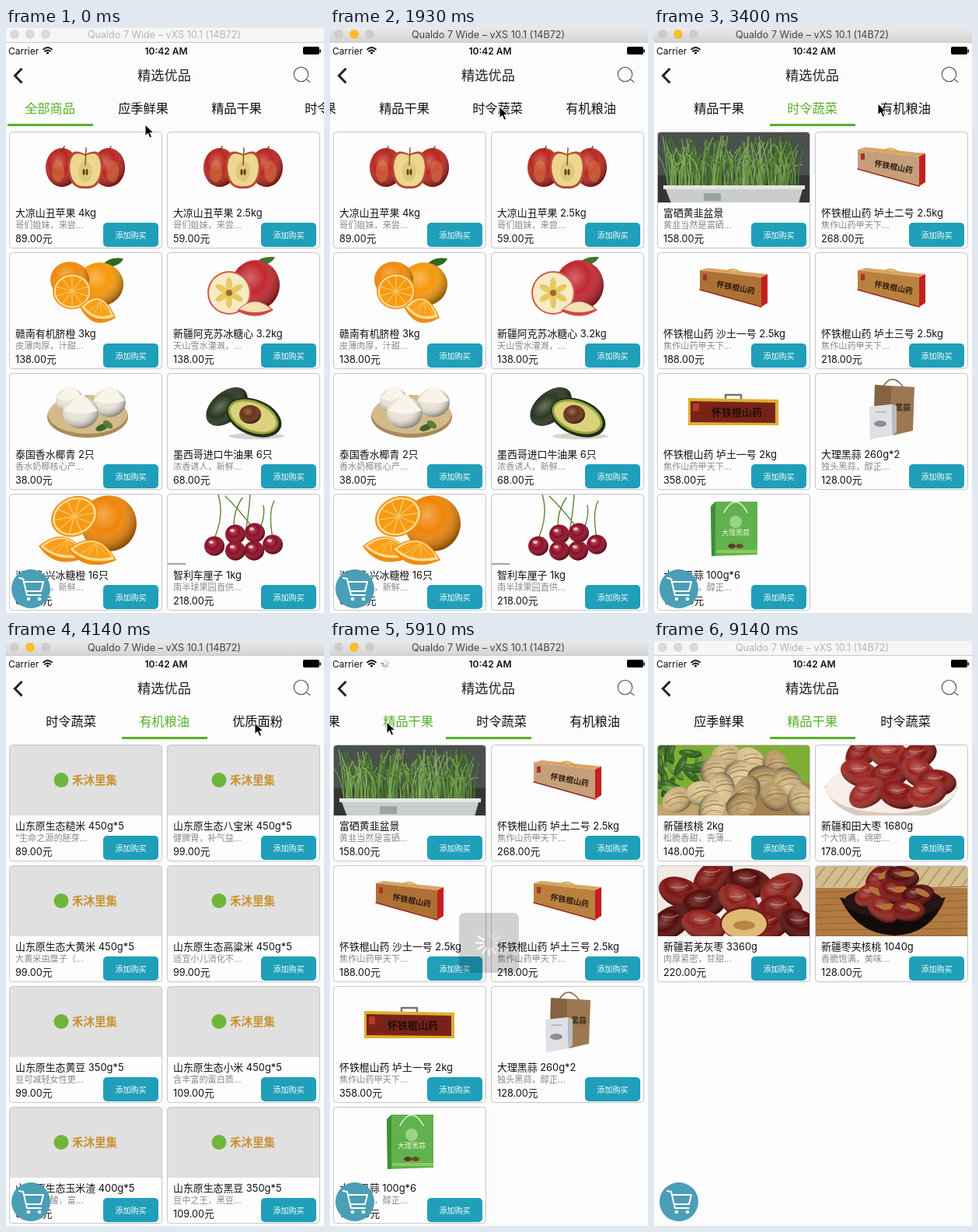
An HTML page that plays this animation: 409 by 751 pixels, repeating every 9200 ms.

```html
<!DOCTYPE html>
<html lang="zh-CN">
<head>
<meta charset="utf-8">
<style>
  html, body { margin: 0; width: 100%; height: 100%; overflow: hidden; background: #fcfcfc; }
  svg { display: block; font-family: Inter, "Noto Sans CJK SC", "Noto Sans CJK", sans-serif; }
</style>
</head>
<body>
<svg id="stage" width="409" height="751" viewBox="0 0 409 751"></svg>
<script>
const LOOP = 9200;
const stage = document.getElementById('stage');
let seed = 11;
const rand = () => (seed = seed * 16807 % 2147483647) / 2147483647;
const pick = list => list[Math.floor(rand() * list.length)];
const repeat = (n, make) => Array.from({ length: n }, (_, i) => make(i)).join('');

// Shape helpers
const rect = (x, y, w, h, fill, extra = '') =>
  `<rect x="${x}" y="${y}" width="${w}" height="${h}" fill="${fill}" ${extra}/>`;
const ell = (x, y, rx, ry, fill, turn = 0) =>
  `<ellipse cx="${x}" cy="${y}" rx="${rx}" ry="${ry}" fill="${fill}" transform="rotate(${turn} ${x} ${y})"/>`;
const ball = (x, y, rx, ry, fill, turn = 0) =>
  ell(x, y, rx, ry, fill, turn) + ell(x, y, rx, ry, 'url(#shade)', turn);
const path = (d, fill) => `<path d="${d}" fill="${fill}"/>`;
const line = (d, color, width = 1) =>
  `<path d="${d}" fill="none" stroke="${color}" stroke-width="${width}" stroke-linecap="round" stroke-linejoin="round"/>`;
const text = (x, y, size, fill, str, extra = '') =>
  `<text x="${x}" y="${y}" font-size="${size}" fill="${fill}" ${extra}>${str}</text>`;
const MID = 'text-anchor="middle"';
const heap = (n, x, y, w, h, rx, ry, colors) => repeat(n, () => {
  const a = rand() * 2 * Math.PI, r = Math.sqrt(rand());
  return ball(x + w * r * Math.cos(a), y + h * r * Math.sin(a), rx, ry, pick(colors), rand() * 180);
});
const spokes = (n, inner, outer, color, width) => repeat(n, i =>
  `<path d="M0 ${-inner}V${-outer}" stroke="${color}" stroke-width="${width}" stroke-linecap="round"
    opacity="${(i + 1) / n}" transform="rotate(${i * 360 / n})"/>`);

// Product pictures, 196 by 90
const citrus = (x, y, rx, ry, turn = 0) =>
  `<g transform="translate(${x} ${y}) rotate(${turn}) scale(${rx} ${ry})">` +
  ell(0, 0, 1, 1, '#f08f0c') + ell(0, 0, .93, .93, '#fbdc9a') + ell(0, 0, .84, .84, '#f79a14') +
  repeat(10, i => `<path d="M0 0V-.84" stroke="#fcc864" stroke-width=".05" transform="rotate(${i * 36})"/>`) + '</g>';
const wedge = (x, y, w) =>
  path(`M${x} ${y}Q${x + w * .6} ${y - 30} ${x + w} ${y + 14}Q${x + w * .35} ${y + 32} ${x} ${y}Z`, '#f08a0c') +
  path(`M${x + 2} ${y}Q${x + w * .6} ${y - 27} ${x + w - 2} ${y + 13}Q${x + w * .4} ${y + 22} ${x + 2} ${y}Z`, '#fcdc98') +
  path(`M${x + 6} ${y}Q${x + w * .6} ${y - 22} ${x + w - 6} ${y + 10}Q${x + w * .42} ${y + 17} ${x + 6} ${y}Z`, '#f9a01a') +
  repeat(4, i => line(`M${x + w * .58} ${y - 7}L${x + w * (.2 + i * .2)} ${y + 8}`, '#fcc864'));
const yamBox = (front, label = '#2c1a12') =>
  path('M55 22L65 19L142 27L134 31Z', '#d9a468') + path('M55 22L134 31V69L55 47Z', front) +
  path('M134 31L142 27V64L134 69Z', '#c4201f') + line('M55 47L134 69', '#9c2a1e', 1.5) +
  line('M88 24Q98 16 110 27', '#d2a63c', 1.5) + rect(59, 27, 5, 8, '#a83325') +
  text(76, 43, 10, label, '怀铁棍山药', 'font-weight="800" transform="rotate(11 76 43)"');
const walnut = ([x, y], i) => ball(x, y, 20, 16, ['#cdb27c', '#d8c08c', '#b99a63'][i % 3], i * 37) +
  line(`M${x - 15} ${y + 4}Q${x} ${y - 9} ${x + 16} ${y - 2}`, '#866534') +
  line(`M${x - 10} ${y + 9}Q${x} ${y - 1} ${x + 12} ${y + 6}M${x - 8} ${y - 6}Q${x + 2} ${y - 11} ${x + 9} ${y - 8}`, '#a5854f');
const date = (rx, ry, colors) => ([x, y], i) =>
  ball(x, y, rx, ry, colors[i % colors.length], i * 47 % 80 - 40) +
  line(`M${x - rx * .5} ${y - ry * .2}q${rx * .4} ${ry * .5} ${rx} ${-ry * .2}`, '#3a080855', 2) +
  line(`M${x - rx * .4} ${y - ry * .4}q${rx * .4} ${ry * .2} ${rx * .7} ${-ry * .1}`, '#e09a8caa', 1.4);
const darkDates = ['#7c1512', '#550d0b', '#92241d'];
const grains = ['#d9b48a', '#bd8b5d', '#e5c8a0'];
const beans = ['#6f2f25', '#d6b58c', '#e9dac2', '#43201c', '#a3674a'];

const photos = {
  apples: () => [68, 128].map((x, i) => ball(x, 45, 21, 25, '#bb2620') +
      ell(x + 10 * i - 5, 50, 8, 14, '#d98a4470') + line(`M${x} 24L${x + 3} 18`, '#6b4423', 1.5)).join('') +
    path('M98 28Q76 16 75 44Q77 74 98 72Q119 74 121 44Q120 16 98 28Z', '#b84a30') +
    path('M98 30Q79 20 78 45Q80 71 98 69Q116 71 118 45Q117 20 98 30Z', '#ecd690') +
    ell(98, 50, 9, 13, '#dfc678') + ell(96, 51, 1.5, 4, '#6b3a1c') + ell(100, 51, 1.5, 4, '#6b3a1c') +
    line('M98 42L99 20', '#7a5a30', 1.5),
  navel: () => path('M118 18Q127 3 147 7Q142 19 118 18Z', '#2f6a22') + ball(117, 40, 30, 28, '#f5980c') +
    ball(78, 34, 25, 23, '#f18a0c') + citrus(81, 49, 25, 23) + wedge(91, 69, 46),
  sweetApple: () => path('M110 18Q118 3 139 5Q133 17 110 18Z', '#3d7628') + ball(114, 41, 31, 32, '#c2272f') +
    ell(80, 51, 28, 28, '#cf5a4a') + ell(80, 51, 26, 26, '#f6ebc4') +
    repeat(6, i => ell(80, 40, 4, 9, '#e9c860').replace('rotate(0 80 40)', `rotate(${i * 60} 80 51)`)) +
    ell(80, 51, 4, 4, '#9c6a30') +
    path('M90 74Q112 50 137 73Q114 88 90 74Z', '#cf4a41') + path('M93 72Q113 53 134 72Q114 80 93 72Z', '#f2e2b4'),
  coconut: () => ell(101, 55, 52, 27, '#a98a58') + ell(101, 52, 51, 25, '#d3ba8c') +
    [[78, 34, 18], [129, 37, 21], [92, 50, 23]].map(([x, y, r]) =>
      ball(x, y, r, r * .88, '#e9e2d5') +
      path(`M${x - r + 1} ${y - 3}L${x - 3} ${y - r}L${x + 4} ${y - r}L${x + r - 1} ${y - 3}Q${x} ${y + 5} ${x - r + 1} ${y - 3}Z`, '#f8f4ea')).join('') +
    ell(119, 69, 8, 4, '#3c6426', -20) + ell(127, 65, 7, 4, '#587f38', 35),
  avocado: () => ell(115, 80, 36, 4, '#d4d4ce') + ball(77, 42, 31, 19, '#2b3820', -40) +
    ell(112, 56, 37, 23, '#232f16', 22) + ell(111, 55, 34, 20, '#93a440', 22) +
    ell(111, 55, 31, 17, '#dcd17c', 22) + ball(107, 52, 14, 12, '#6a3216'),
  oranges: () => ball(128, 37, 36, 36, '#ef8508') + citrus(84, 28, 31, 25, -25) + wedge(38, 66, 62) + wedge(76, 70, 62),
  cherries: () => line('M61 56Q74 26 66 0M88 52Q82 26 97 4M113 46Q92 18 75 2M101 48Q106 20 107 0M136 56Q130 22 138 8M110 66Q128 32 124 14', '#5f8436', 1.4) +
    [[88, 51], [113, 49], [61, 66], [136, 64], [112, 72], [88, 72]].map(([x, y]) =>
      ball(x, y, 13, 12.5, '#8f0d26') + ell(x - 4, y - 5, 3, 2, '#f2b9c0')).join('') +
    line('M0 89H24', '#5d4638'),
  chives: () => rect(0, 0, 197, 91, '#4a504d') + rect(0, 55, 197, 36, '#343633') +
    repeat(260, () => {
      const x = 14 + rand() * 168;
      return line(`M${x} 72Q${x + rand() * 6 - 3} 40 ${x + rand() * 36 - 18} ${4 + rand() * 38}`,
        pick(['#4d7a31', '#6b9a45', '#3d6428', '#88ad60']), 1.2);
    }) + path('M10 70H188L182 91H18Z', '#c9cecd') + path('M8 68H190V73H8Z', '#e4e6e4') + rect(60, 78, 22, 10, '#98a59d'),
  yamTwo: () => yamBox('#c59f7a'),
  yamSand: () => yamBox('#ad7136'),
  yamThree: () => yamBox('#b9813d'),
  yamCase: () => line('M88 33V27H108V33', '#77736b', 2.5) + path('M40 31L156 33V66L40 66Z', '#dcb02e') +
    path('M43 35L152 37V63L43 62Z', '#7b2218') + rect(46, 38, 8, 10, '#b9382a') +
    text(70, 54, 13, '#1d100c', '怀铁棍山药', 'font-weight="800"'),
  garlicBox: () => path('M77 14L128 17L126 73L100 79L76 60Z', '#9b7851') + path('M77 14L98 17V70L76 60Z', '#836340') +
    line('M88 16Q99 -2 113 16', '#7b6044', 1.5) + text(103, 47, 10, '#3e2a1b', '黑蒜', 'font-weight="700"') +
    path('M70 42L99 39L100 79L71 84Z', '#dfe0e5') + path('M99 39L105 41V75L100 79Z', '#b9bbc2') +
    ell(84, 64, 8, 4, '#8d8d92') + line('M78 49H91', '#999'),
  garlicBag: () => path('M69 15L75 9H129V77L70 79Z', '#5fb24d') + path('M69 15L75 9V78L70 79Z', '#3f8f39') +
    line('M86 23Q101 -4 116 23', '#e8f0da', 1.5) + ell(101, 35, 8, 8, '#9bd287') +
    text(101, 52, 9, '#f3f7dc', '大理黑蒜', MID) + ell(96, 66, 5, 3, '#5b3a25') + ell(106, 66, 5, 3, '#6f4a2c') + rect(76, 71, 53, 4, '#8cc95e'),
  brownRice: () => rect(0, 0, 197, 91, '#3a2a23') + ball(27, 12, 34, 24, '#76543c') + rect(0, 62, 197, 29, '#7b706a') +
    path('M50 45H196Q188 84 124 86Q62 84 50 45Z', '#bcc6cc') + ell(123, 46, 73, 16, '#dde3e5') +
    ell(121, 34, 58, 25, '#c59a6c') + heap(170, 121, 34, 57, 24, 3.2, 1.4, grains) +
    text(18, 67, 16, '#fff', '原生态糙米', 'font-weight="600"'),
  mixedRice: () => rect(0, 0, 197, 91, '#2a1b17') + ball(24, 10, 42, 34, '#6a3c26') + heap(60, 24, 20, 34, 20, 3, 2, beans) +
    path('M72 38H182Q178 82 127 84Q78 82 72 38Z', '#7c4a2d') + ell(127, 38, 56, 25, '#a06a43') +
    ell(127, 38, 50, 21, '#8a5d49') + heap(110, 127, 38, 48, 20, 3.8, 2.6, beans) +
    text(17, 65, 16, '#fff', '原生态八宝米', 'font-weight="600"'),
  walnuts: () => rect(0, 0, 197, 91, '#7fae35') + heap(22, 24, 26, 36, 34, 15, 5, ['#2f6419', '#5f9330', '#437a22']) +
    rect(0, 76, 197, 15, '#c2a46c') + path('M120 52Q160 34 197 50V91H112Z', '#a3804c') +
    [[90, 14], [120, 20], [152, 26], [72, 32], [104, 36], [136, 42], [168, 46], [84, 54], [116, 58], [26, 70], [58, 62], [150, 66], [184, 70], [70, 80], [108, 77]].map(walnut).join(''),
  redDates: () => path('M12 52H184Q174 94 98 97Q24 94 12 52Z', '#d8cabf') + ell(98, 55, 84, 32, '#f5efe8') +
    [[62, 8], [96, 12], [132, 14], [58, 36], [95, 38], [134, 36], [156, 48], [68, 61], [108, 64], [144, 62]]
      .map(date(26, 17, ['#8a1a18', '#a02a24'])).join(''),
  greyDates: () => rect(0, 0, 197, 91, '#f0e9e4') +
    [[72, 14], [118, 22], [160, 30], [30, 34], [60, 48], [105, 46], [158, 56], [18, 72], [60, 76], [143, 76], [184, 76]]
      .map(date(29, 19, darkDates)).join('') +
    ell(112, 73, 31, 21, '#6d1712') + ell(112, 74, 29, 19, '#e0ba74') + ell(112, 76, 14, 6, '#b88543'),
  walnutDates: () => rect(0, 0, 197, 91, '#b07a42') + rect(0, 0, 197, 28, '#d3bd8f') +
    repeat(14, i => line(`M${i * 15 - 6} 26L${i * 15 + 12} 2`, '#b39a68', 2)) +
    repeat(8, i => line(`M0 ${34 + i * 8}L197 ${26 + i * 9}`, '#936431')) +
    path('M32 40Q94 60 168 40Q150 88 102 89Q53 87 32 40Z', '#120b0b') + ell(101, 46, 64, 20, '#251514') +
    [[84, 15], [112, 14], [72, 36], [103, 34], [132, 38], [87, 56], [120, 57]].map((at, i) =>
      date(22, 14, darkDates)(at, i) + ell(at[0] + 6, at[1] - 4, 10, 4, '#b07436', i * 29 % 60 - 30)).join('')
};

const pages = [
  `大凉山丑苹果 4kg|哥们姐妹，来尝…|89.00|apples
大凉山丑苹果 2.5kg|哥们姐妹，来尝…|59.00|apples
赣南有机脐橙 3kg|皮薄肉厚，汁甜…|138.00|navel
新疆阿克苏冰糖心 3.2kg|天山雪水灌溉，…|138.00|sweetApple
泰国香水椰青 2只|香水奶椰核心产…|38.00|coconut
墨西哥进口牛油果 6只|浓香诱人，新鲜…|68.00|avocado
湖南永兴冰糖橙 16只|香甜多汁，新鲜…|68.00|oranges
智利车厘子 1kg|南半球果园直供…|218.00|cherries`,
  `富硒黄韭盆景|黄韭当然是富硒…|158.00|chives
怀铁棍山药 垆土二号 2.5kg|焦作山药甲天下…|268.00|yamTwo
怀铁棍山药 沙土一号 2.5kg|焦作山药甲天下…|188.00|yamSand
怀铁棍山药 垆土三号 2.5kg|焦作山药甲天下…|218.00|yamThree
怀铁棍山药 垆土一号 2kg|焦作山药甲天下…|358.00|yamCase
大理黑蒜 260g*2|独头黑蒜，醇正…|128.00|garlicBox
大理黑蒜 100g*6|独头黑蒜，醇正…|158.00|garlicBag`,
  `山东原生态糙米 450g*5|“生命之源的胚芽…|89.00|brownRice
山东原生态八宝米 450g*5|健脾胃，补气益…|99.00|mixedRice
山东原生态大黄米 450g*5|大黄米由糜子（…|99.00|
山东原生态高粱米 450g*5|适宜小儿消化不…|99.00|
山东原生态黄豆 350g*5|豆可减轻女性更…|99.00|
山东原生态小米 450g*5|含丰富的蛋白质…|109.00|
山东原生态玉米渣 400g*5|富含亚油酸，富…|99.00|
山东原生态黑豆 350g*5|豆中之王，黑豆…|109.00|`,
  `新疆核桃 2kg|松脆香甜，壳薄…|148.00|walnuts
新疆和田大枣 1680g|个大饱满，绵密…|178.00|redDates
新疆若羌灰枣 3360g|肉厚紧密，甘甜…|220.00|greyDates
新疆枣夹核桃 1040g|香脆饱满，美味…|128.00|walnutDates`
].map(rows => rows.split('\n').map(row => row.split('|')));
const photoTimes = [[0], [2810], [4430, 4570], [8000, 8150, 8300, 8450]];
const tabs = ['全部商品', '应季鲜果', '精品干果', '时令蔬菜', '有机粮油', '优质面粉'];

const placeholder = rect(0, 0, 197, 91, '#e0e0e0') + ell(67, 44.5, 9.5, 9.5, '#6fb53c') +
  text(81, 50, 14.5, '#c9922f', '禾沐里集', 'font-weight="700"');
const card = ([name, note, price, photo], i) =>
  `<g transform="translate(${i % 2 ? 207 : 4} ${133 + 155 * (i >> 1)})">` +
  rect(.5, .5, 196, 149, '#fdfdfd', 'rx="4"') +
  `<g clip-path="url(#top)"><g transform="translate(0 1)">${placeholder}` +
  `<g class="photo">${photo ? rect(0, 0, 197, 91, '#fdfdfd') + photos[photo]() : ''}</g></g></g>` +
  rect(.5, .5, 196, 149, 'none', 'rx="4" stroke="#c6c6c6"') +
  text(8, 108.5, 12.9, '#111', name) + text(8, 124.3, 11.15, '#888', note) + text(8, 141.5, 12.7, '#111', price + '元') +
  rect(121, 117, 71, 31, '#1f9fb9', 'rx="5"') + text(156.5, 136.6, 10, '#fff', '添加购买', MID) + '</g>';

stage.innerHTML = `<defs>
  <radialGradient id="shade" cx=".4" cy=".35" r=".65">
    <stop offset="0" stop-color="#fff" stop-opacity=".3"/><stop offset=".45" stop-color="#fff" stop-opacity="0"/>
    <stop offset="1" stop-color="#000" stop-opacity=".4"/></radialGradient>
  <linearGradient id="bar" x2="0" y2="1"><stop stop-color="#e9e9e9"/><stop offset="1" stop-color="#d3d3d3"/></linearGradient>
  <clipPath id="top"><path d="M.5 91V4.5Q.5 .5 4.5 .5H192.5Q196.5 .5 196.5 4.5V91Z"/></clipPath>
</defs>` +
  rect(0, 0, 409, 751, '#fcfcfc') +
  rect(0, 0, 409, 19, '#f6f6f6', 'id="bar-fill"') + rect(0, 18, 409, 1, '#c9c9c9') +
  [11, 31, 51].map(x => `<circle class="dot" cx="${x}" cy="8" r="6" fill="#d6d6d6"/>`).join('') +
  text(203.5, 13, 12.6, '#b4b4b4', 'Qualdo 7 Wide – vXS 10.1 (14B72)', MID + ' id="window-title"') +
  text(3, 34, 12, '#111', 'Carrier') + text(206, 34, 12, '#111', '10:42 AM', MID + ' font-weight="600"') +
  line('M48 27.5Q53.5 22.5 59 27.5M50 30Q53.5 27 57 30', '#111', 1.7) + ell(53.5, 32, 1.6, 1.6, '#111') +
  rect(382, 24, 21, 10, '#000', 'rx="2"') + rect(403.5, 27.5, 1.5, 4, '#000') +
  `<g id="network">${spokes(8, 2.5, 5, '#777', 1.3)}</g>` +
  '<path d="M20.5 52L11.5 61.2L20.5 70.5" fill="none" stroke="#222" stroke-width="3"/>' +
  text(203.5, 67, 17.2, '#222', '精选优品', MID + ' font-weight="500"') +
  '<circle cx="379.5" cy="59.5" r="9.2" fill="none" stroke="#555" stroke-width="1.1"/>' + line('M387 66.5L391 69.5', '#555', 1.1) +
  '<g id="tabs">' + tabs.map((name, i) => text(56.5 + 120 * i, 109, 16.2, '#111', name, MID + ' class="tab"')).join('') +
  rect(-55, 123, 110, 3, '#57b02b', 'id="underline"') + '</g>' +
  pages.map(list => `<g class="page">${list.map(card).join('')}</g>`).join('') +
  ell(32, 720, 25, 25, '#4a9eb6') +
  line('M17 706L22 707L27 728H45M23 711H48L45 723H26', '#fff', 2) + ell(29, 733, 2.3, 2.3, '#fff') + ell(43, 733, 2.3, 2.3, '#fff') +
  `<g id="hud">${rect(166, 349, 77, 77, '#000', 'rx="7" opacity=".65"')}<g id="wheel">${spokes(12, 8, 16, '#fff', 2.6)}</g></g>` +
  '<path id="cursor" d="M0 0V14.5L3.5 11.3L6 17.2L8.6 16.1L6.2 10.5H10.8Z" fill="#000" stroke="#fff" stroke-width="1"/>';

// The screen refreshes only in bursts of evenly spaced ticks: [first, last, count]
const ticks = [[0, 0, 1], [150, 1180, 8], [1330, 1930, 5], [2230, 3250, 8], [3400, 4140, 6], [4430, 5470, 8],
  [5620, 5620, 1], [5910, 6210, 3], [8000, 8750, 6], [9140, 9140, 1]].flatMap(([first, last, count]) =>
  Array.from({ length: count }, (_, i) => Math.floor((first + i * (last - first) / (count - 1 || 1)) / 10) * 10));
// Tab presses: [pressed, loaded, page, tab]
const visits = [[2200, 2660, 1, 3], [3620, 3990, 2, 4], [5000, 5320, 1, 3], [5830, 6060, 3, 2]];
const cursorPath = [[150, 179, 124], [440, 205, 134], [880, 325, 128], [1180, 305, 119], [1780, 218, 101], [2810, 218, 101],
  [3400, 288, 97], [3550, 320, 105], [4430, 320, 105], [4870, 81, 105], [5470, 78, 105], [5620, 73, 104],
  [8000, 73, 104], [8600, 150, 735], [8750, 160, 760]];

const clamp = v => Math.max(0, Math.min(1, v));
const easeInOut = v => (v = clamp(v)) < .5 ? 2 * v * v : 1 - 2 * (1 - v) ** 2;
const easeOut = v => 1 - (1 - clamp(v)) ** 2;
const $ = id => document.getElementById(id);
const all = (selector, root = stage) => [...root.querySelectorAll(selector)];
const show = (el, on) => el.style.display = on ? '' : 'none';
const move = (el, x, y, turn = 0) => el.setAttribute('transform', `translate(${x} ${y}) rotate(${turn})`);
const dots = all('.dot'), tabTexts = all('.tab');
const pageGroups = all('.page').map(el => ({ el, photos: all('.photo', el) }));

function cursorAt(t) {
  const next = cursorPath.findIndex(key => key[0] > t);
  if (next < 1) return cursorPath.at(next).slice(1);
  const [t0, x0, y0] = cursorPath[next - 1], [t1, x1, y1] = cursorPath[next];
  const k = (t - t0) / (t1 - t0);
  return [x0 + (x1 - x0) * k, y0 + (y1 - y0) * k];
}

function render(t) {
  let scroll = 201 * easeOut((t - 1030) / 900), mark = 57, page = 0, tab = 0, wait = 0;
  for (const [pressed, loaded, toPage, toTab] of visits) {
    if (t < pressed) break;
    const center = 57 + 120 * toTab, k = easeInOut((t - pressed) / 300);
    scroll += (center - 204 - scroll) * k;
    mark += (center - mark) * k;
    tab = toTab;
    if (t >= loaded) page = toPage;
    wait = t < loaded ? t - pressed : 0;
  }
  const active = t >= 150 && t < 9140;
  $('bar-fill').setAttribute('fill', active ? 'url(#bar)' : '#f6f6f6');
  $('window-title').setAttribute('fill', active ? '#444' : '#b4b4b4');
  dots.forEach((dot, i) => dot.setAttribute('fill', !active ? '#dadada' : i === 1 ? '#fdbd2f' : '#cdcdcd'));

  move($('tabs'), -scroll, 0);
  move($('underline'), mark, 0);
  tabTexts.forEach((el, i) => el.setAttribute('fill', i === tab ? '#57b02b' : '#111'));

  pageGroups.forEach(({ el, photos }, p) => {
    show(el, p === page);
    const times = photoTimes[p];
    photos.forEach((photo, i) => show(photo, t >= times[Math.min(i, times.length - 1)]));
  });

  const turn = Math.floor(t / 83) * 30;
  show($('network'), wait > 0);
  move($('network'), 71, 29, turn * 1.5);
  $('hud').setAttribute('opacity', clamp(wait / 300));
  move($('wheel'), 204.5, 387.5, turn);
  move($('cursor'), ...cursorAt(t));
}

function frame() {
  const now = performance.now() % LOOP;
  render(ticks.findLast(tick => tick <= now));
  requestAnimationFrame(frame);
}
frame();
</script>
</body>
</html>
```
